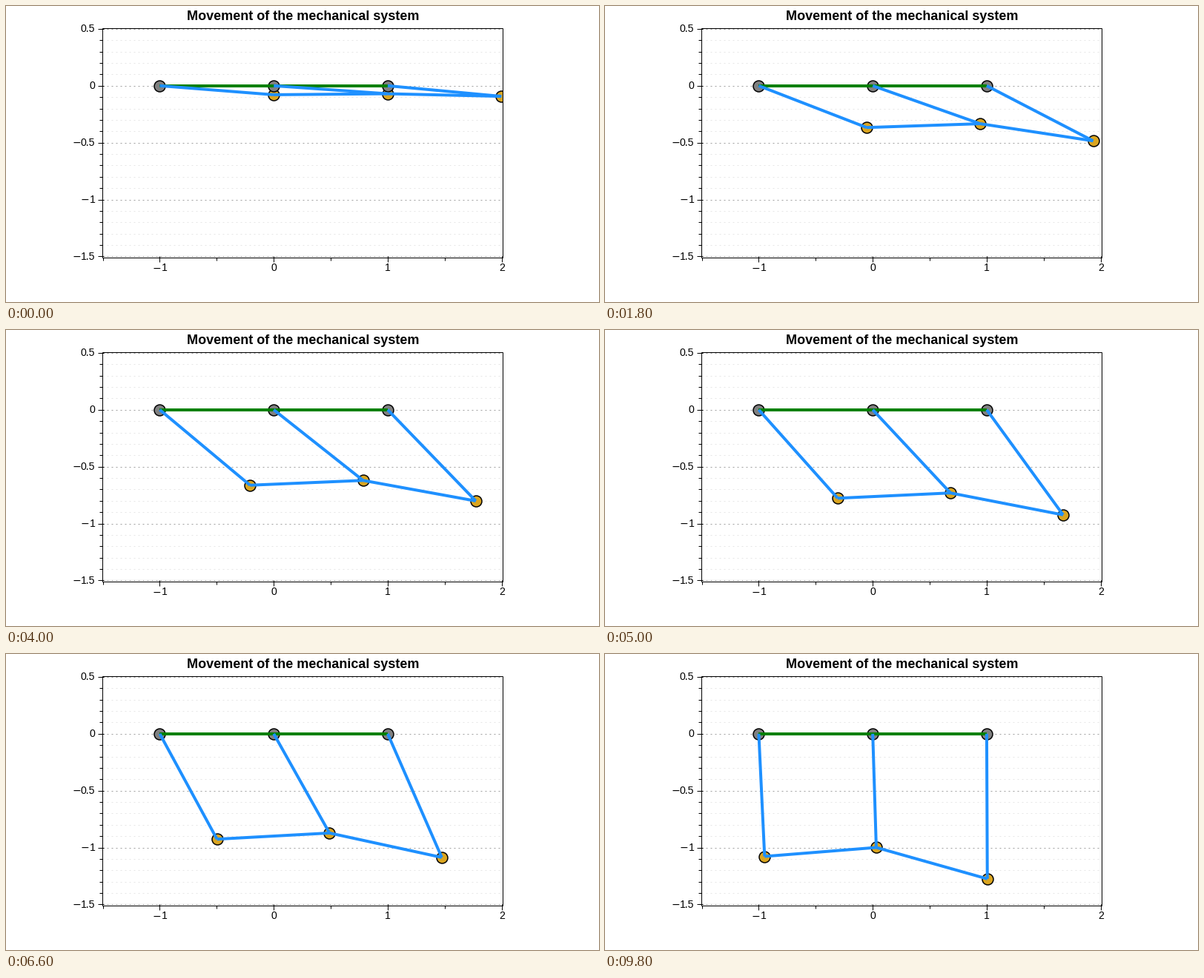
A matplotlib script for the animation above (9900 ms loop, 800 px wide and 400 px high).

```python
import matplotlib.pyplot as plt
import numpy as np
from matplotlib.animation import FuncAnimation
from matplotlib.patches import Rectangle

W, H, DPI = 800, 400, 100
FRAMES, INTERVAL = 99, 100
PX = 72 / DPI

# Plot area and data-to-pixel mapping
LEFT, RIGHT, TOP, BOTTOM = 129.5, 669.5, 29.5, 339.5
X0, Y0, SCALE = 361.2, 107.8, 153.75

fig = plt.figure(figsize=(W / DPI, H / DPI), dpi=DPI, facecolor="white")
ax = fig.add_axes([0, 0, 1, 1])
ax.set_xlim(0, W)
ax.set_ylim(H, 0)
ax.axis("off")


def px(x):
    return X0 + SCALE * x


def py(y):
    return Y0 - SCALE * y


def line(xs, ys, color="black", width=1, **kw):
    kw.setdefault("solid_capstyle", "butt")
    return ax.plot(xs, ys, color=color, lw=width * PX, **kw)[0]


def label(x, y, value, align):
    """Tick label whose baseline is y; x is its right end or its centre."""
    digits = f"{abs(value):g}"
    minus = 11.7 if value < 0 else 0
    width = sum(3.89 if c == "." else 7.78 for c in digits)
    start = x - (width if align == "right" else (width - minus) / 2)
    style = dict(fontsize=14 * PX, va="baseline", ha="left")
    ax.text(start, y, digits, family="Liberation Sans", **style)
    if minus:
        ax.text(start - minus, y, "\u2212", family="DejaVu Sans", **style)


# Grid and vertical axis
for i in range(-15, 6):
    y = py(i / 10)
    major = i % 5 == 0
    line([LEFT, RIGHT], [y, y], "#a0a0a0" if major else "#e6e6e6",
         ls=(0, (2, 4)), dash_capstyle="butt", zorder=1)
    inner, outer = (2, 6) if major else (0, 4)
    line([LEFT - outer, LEFT + inner], [y, y], zorder=7)
    if major:
        label(120.3, y + 4.2, i / 10, "right")

# Horizontal axis
for i in range(-3, 5):
    x = px(i / 2)
    major = i % 2 == 0
    inner, outer = (2, 6) if major else (0, 4)
    line([x, x], [BOTTOM - inner, BOTTOM + outer], zorder=7)
    if major:
        label(x, 358.5, i / 2, "center")

area = Rectangle((LEFT, TOP), RIGHT - LEFT, BOTTOM - TOP,
                 fill=False, ec="black", lw=PX, zorder=6)
ax.add_patch(area)
ax.text(400.5, 19.2, "Movement of the mechanical system", fontsize=18 * PX,
        family="Liberation Sans", weight="bold", ha="center", va="baseline")


def markers(color, zorder):
    dots = line([], [], ls="none", marker="o", ms=15 * PX, mfc=color,
                mec="black", mew=1.5 * PX, zorder=zorder)
    dots.set_clip_path(area)
    return dots


PIVOTS = np.array([-1, 0, 1], dtype=complex)
joints = markers("goldenrod", 2)
markers("gray", 3).set_data(px(PIVOTS.real), py(PIVOTS.imag))
line(px(PIVOTS.real), py(PIVOTS.imag), "green", 4, zorder=4)
rods = [line([], [], "dodgerblue", 4, zorder=5) for _ in range(5)]
for rod in rods:
    rod.set_clip_path(area)


def meet(p, r, q, s, side):
    """Point at distance r from p and s from q, left (+1) or right (-1) of pq."""
    d = abs(q - p)
    a = (d * d + r * r - s * s) / (2 * d)
    h = max(r * r - a * a, 0) ** 0.5
    return p + (q - p) / d * complex(a, side * h)


def pose(n):
    """The middle rod turns evenly while the other rods change length."""
    mid = np.exp(-1j * (0.07 + 0.015 * n))
    left = meet(-1, 1.0007 + 0.0008 * n, mid, 1 - 0.000175 * n, -1)
    right = meet(1, 1.0016 + 0.00279 * n, mid, 1 + 0.00013 * n, 1)
    return np.array([left, mid, right])


def update(n):
    ends = pose(n)
    joints.set_data(px(ends.real), py(ends.imag))
    pairs = list(zip(PIVOTS, ends)) + list(zip(ends[:-1], ends[1:]))
    for rod, pair in zip(rods, pairs):
        pair = np.array(pair)
        rod.set_data(px(pair.real), py(pair.imag))
    return [joints, *rods]


anim = FuncAnimation(fig, update, frames=FRAMES, interval=INTERVAL,
                     repeat=True, repeat_delay=0)
plt.show()
```
